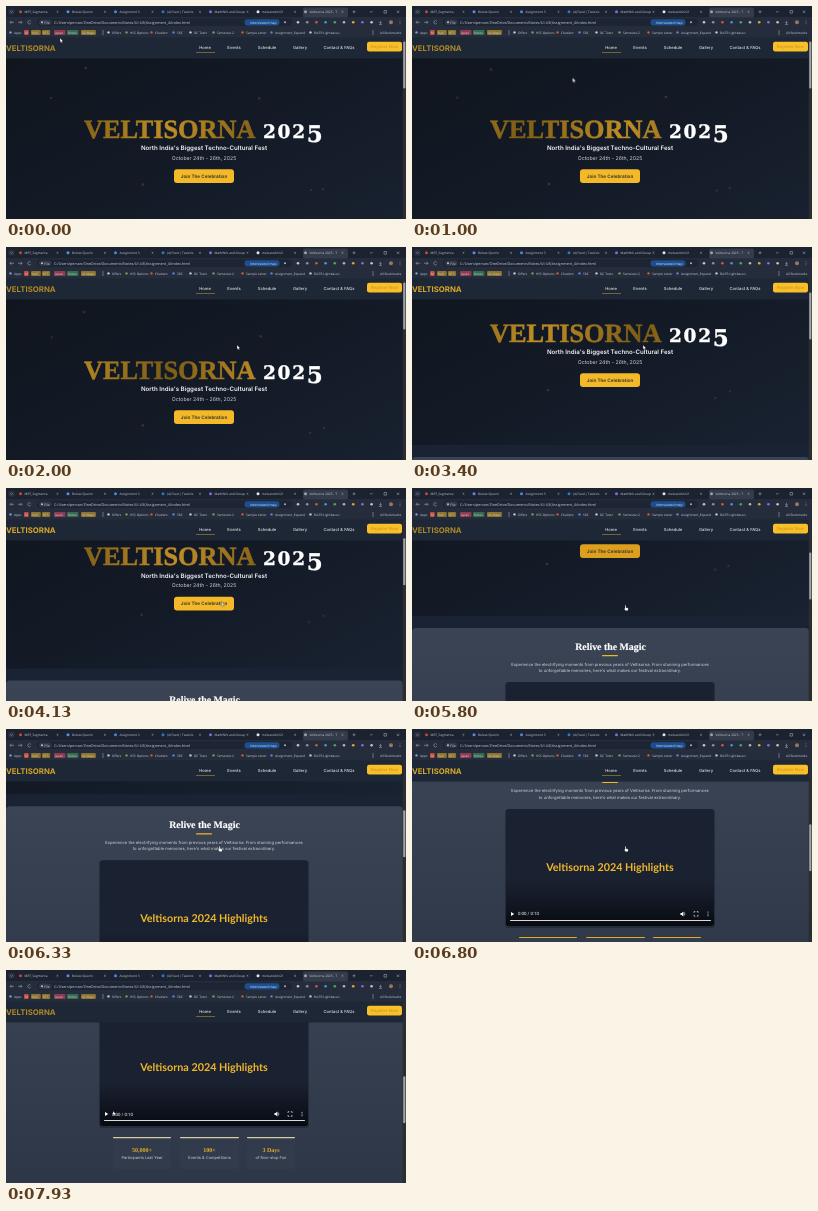
Animation of 400x213 px, one loop 8000 ms. Source, as an HTML page:

```html
<!DOCTYPE html>
<html lang="en">
<head>
<meta charset="utf-8">
<title>Festival page</title>
<style>
@property --scroll { syntax: "<number>"; inherits: true; initial-value: 0; }
html, body { margin: 0; width: 100%; height: 100%; overflow: hidden; background: #151c28; }
svg { display: block; width: 100%; height: 100%; animation: scroll 8s infinite ease-out; }
text { font-family: Inter, sans-serif; text-rendering: geometricPrecision; }
.mid { text-anchor: middle; }
.serif { font-family: "Liberation Serif", serif; font-weight: 700; }
.year { font-family: "DejaVu Serif", serif; font-weight: 700; letter-spacing: 1.7px; fill: #fff; stroke: #fff; stroke-width: .4; }
.ui { font-family: "Open Sans", sans-serif; fill: #c9ced8; }
.page { transform: translateY(calc(var(--scroll) * -1px)); }
.thumb { transform: translateY(calc(var(--scroll) * .27px)); }
.nav text { font-size: 4.17px; font-weight: 500; fill: #dde1e7; }
.blurb { font-size: 4.17px; fill: #cfd4dc; }
.stat { font-size: 6px; fill: #e3ae28; }
.label { font-size: 4px; fill: #ccd1d9; }
.logo { animation: glow 8s infinite; }
.cta { animation: hover 8s infinite; }
.rule { animation: pale 8s infinite; }
.pointer { animation: point 8s infinite ease-in-out; }
.arrow { animation: arrow 8s infinite step-end; }
.hand { animation: hand 8s infinite step-end; }
.mote { animation: drift 5s infinite alternate ease-in-out; }

@keyframes scroll {
  0%, 34% { --scroll: 0; }
  41.8%, 45% { --scroll: 37; }
  50%, 64.3% { --scroll: 54.5; }
  72%, 75.5% { --scroll: 107; }
  85% { --scroll: 221; }
  92%, 100% { --scroll: 262; }
}
@keyframes glow {
  0%, 25%, 73%, 100% { fill: #b08a28; }
  42%, 64%, 85% { fill: #dcaa2a; }
}
@keyframes hover {
  0%, 52% { fill: #f3b928; }
  55%, 100% { fill: #dda01e; }
}
@keyframes pale {
  0%, 86% { fill: #e0aa25; }
  92%, 100% { fill: #d5cba8; }
}
@keyframes point {
  0%, 3% { transform: translate(54px, 32px); }
  20%, 46% { transform: translate(231px, 98px); }
  54%, 89% { transform: translate(212px, 117px); }
  97%, 100% { transform: translate(107px, 141px); }
}
@keyframes arrow { 0% { opacity: 1; } 52% { opacity: 0; } 89% { opacity: 1; } }
@keyframes hand { 0% { opacity: 0; } 52% { opacity: 1; } 89% { opacity: 0; } }
@keyframes drift { to { transform: translate(2px, -5px); } }
</style>
</head>
<body>
<svg viewBox="0 0 400 213" preserveAspectRatio="none">
  <defs>
    <linearGradient id="sky" x1="0" y1="0" x2="1" y2="1">
      <stop stop-color="#10151d"/><stop offset=".5" stop-color="#131a26"/><stop offset="1" stop-color="#192231"/>
    </linearGradient>
    <linearGradient id="panel" x1="0" y1="0" x2="0" y2="1">
      <stop stop-color="#3a4454"/><stop offset="1" stop-color="#2b3545"/>
    </linearGradient>
    <linearGradient id="gold" gradientUnits="userSpaceOnUse" x1="78" y1="0" x2="278" y2="30" spreadMethod="repeat">
      <stop stop-color="#7c5c16"/><stop offset=".5" stop-color="#bf8e25"/><stop offset="1" stop-color="#7c5c16"/>
      <animateTransform attributeName="gradientTransform" type="translate" from="0 0" to="200 0" dur="4s" repeatCount="indefinite"/>
    </linearGradient>
    <linearGradient id="shade" x1="0" y1="0" x2="0" y2="1">
      <stop stop-color="#0b0f18" stop-opacity="0"/><stop offset="1" stop-color="#070a10"/>
    </linearGradient>
  </defs>

  <g class="page">
    <rect y="31" width="400" height="460" fill="#1a2333"/>
    <rect y="31" width="400" height="204" fill="url(#sky)"/>
    <g id="motes" fill="#a9803a" opacity=".3"></g>
    <text class="serif" x="78" y="131.5" font-size="26.3" fill="url(#gold)" stroke="url(#gold)" stroke-width=".5">VELTISORNA</text>
    <text class="year" x="257" y="131.5" font-size="18.5">202<tspan dy="4.6" font-size="23">5</tspan></text>
    <text class="mid" x="198" y="144" font-size="6.15" font-weight="600" fill="#f4f5f7">North India's Biggest Techno-Cultural Fest</text>
    <text class="mid" x="198" y="153.5" font-size="5.2" fill="#cdd2da">October 24th - 26th, 2025</text>
    <rect class="cta" x="168" y="163.3" width="60" height="13.7" rx="3"/>
    <text class="mid" x="198" y="171.8" font-size="4.65" font-weight="600" fill="#2b2d30">Join The Celebration</text>

    <rect y="247" width="397" height="260" rx="4" fill="url(#panel)"/>
    <text class="serif mid" x="198.5" y="269" font-size="9.9" fill="#fff" stroke="#fff" stroke-width=".2">Relive the Magic</text>
    <rect x="190" y="274" width="16" height="1.2" rx=".6" fill="#f2b526"/>
    <text class="blurb mid" x="198" y="284.6">Experience the electrifying moments from previous years of Veltisorna. From stunning performances</text>
    <text class="blurb mid" x="198" y="291.1">to unforgettable memories, here's what makes our festival extraordinary.</text>

    <rect x="93" y="301" width="210" height="119" rx="3.5" fill="#151c29" opacity=".45"/>
    <rect x="94" y="301" width="208" height="117" rx="3" fill="#1a2130"/>
    <rect x="94" y="372" width="208" height="46" rx="3" fill="url(#shade)"/>
    <text class="mid" x="198" y="363" font-size="10.8" font-weight="700" fill="#f0b72b" style="font-family:Lato,sans-serif">Veltisorna 2024 Highlights</text>
    <g fill="#fff">
      <path d="M99 404v4l3.2-2z"/>
      <text x="106" y="407.6" font-size="4.4" style="font-family:Roboto,sans-serif">0:00 / 0:10</text>
      <path d="M268.5 405h1.2l1.7-1.5v5l-1.7-1.5h-1.2z"/>
      <path d="M272.2 404.4q1.4 1.6 0 3.2M282 405v-1.3h1.3m1.5 0h1.3v1.3m0 2v1.3h-1.3m-1.5 0H282V407" fill="none" stroke="#fff" stroke-width=".6"/>
      <circle cx="296" cy="404.2" r=".5"/><circle cx="296" cy="406" r=".5"/><circle cx="296" cy="407.8" r=".5"/>
      <rect x="98" y="412" width="201" height="1" rx=".5" fill="#d9dbde"/>
    </g>
    <g id="stats"></g>
  </g>

  <rect y="31" width="397" height="21.5" fill="#1d2735"/>
  <text class="logo" x="0" y="44.8" font-size="7.8" font-weight="700">VELTISORNA</text>
  <g class="nav mid" id="nav"></g>
  <rect x="190" y="46" width="19" height=".6" fill="#b58d2c"/>
  <rect x="361" y="35.7" width="35" height="9.8" rx="2.2" fill="#f8bf2a"/>
  <text class="mid" x="378.5" y="42.1" font-size="4.17" font-weight="600" fill="#d39c1f">Register Now</text>

  <rect x="396.7" y="31" width="3.3" height="182" fill="#2b2d30"/>
  <rect class="thumb" x="397.2" y="35.5" width="2.2" height="47" rx="1" fill="#a0a2a5"/>

  <g id="browser"></g>

  <g class="pointer" stroke="#111" stroke-width=".3" fill="#fff">
    <path class="arrow" d="M0 0v4.4l1-.9.7 1.6.8-.4-.7-1.5h1.4z"/>
    <path class="hand" d="M1 .4q.5-.7 1 0v2l1.8.5q.7.3.5 1.2l-.5 1.6H1.6L0 3.8q0-.7 1-.2z"/>
  </g>
</svg>
<script>
const NS = "http://www.w3.org/2000/svg";
const into = (id) => (tag, attrs, content = "") => {
  const node = document.createElementNS(NS, tag);
  for (const [key, value] of Object.entries(attrs)) node.setAttribute(key, value);
  node.textContent = content;
  document.getElementById(id).append(node);
  return node;
};

// Page parts
const mote = into("motes");
[[45, 92], [253, 93], [316, 186], [135, 183], [303, 189], [78, 66]].forEach(([cx, cy], i) =>
  mote("circle", { cx, cy, r: 1 + (i % 2) * .3, class: "mote", style: `animation-delay:${-i * 1.3}s` }));

const nav = into("nav");
[["Home", 199], ["Events", 228], ["Schedule", 261], ["Gallery", 294], ["Contact & FAQs", 333]].forEach(([name, x]) =>
  nav("text", { x, y: 43.4 }, name));

const stat = into("stats");
[["50,000+", "Participants Last Year", 107, 58], ["100+", "Events & Competitions", 174, 59], ["3 Days", "of Non-stop Fun", 241, 48]]
  .forEach(([value, label, x, width]) => {
    const mid = x + width / 2;
    stat("rect", { x, y: 429, width, height: 32, rx: 2, fill: "#343e4e", opacity: .5 });
    stat("rect", { x, y: 429, width, height: 1.2, rx: .6, class: "rule" });
    stat("text", { x: mid, y: 444, class: "serif stat mid" }, value);
    stat("text", { x: mid, y: 451, class: "label mid" }, label);
  });

// Browser window
const ui = into("browser");
const bar = (x, y, width, height, fill, rx = 0) => ui("rect", { x, y, width, height, fill, rx });
const dot = (cx, cy, fill, r = 1.5) => ui("circle", { cx, cy, r, fill });
const word = (x, y, content, size = 3.2) => ui("text", { x, y, class: "ui", "font-size": size }, content);
const line = (d) => ui("path", { d, fill: "none", stroke: "#b4bac6", "stroke-width": .5 });
const cross = (x, y, r = .8) => line(`M${x - r} ${y - r}l${2 * r} ${2 * r}m0 ${-2 * r}l${-2 * r} ${2 * r}`);

bar(0, 0, 400, 11, "#1b2230");
bar(0, 11, 400, 20.5, "#252d3d");
bar(297, 1.5, 45, 10, "#343c4c", 2);
bar(2.5, 3, 6, 5.6, "#2c3444", 1.5);
line("M4.3 5.3l1.2 1.2 1.2-1.2");
[["MRT_Segmenta", "#c8453e"], ["Bolvex Quorin", "#5b8def"], ["Assignment 3", "#4c86e8"], ["(4) Feed | Tavlorix", "#2f75c6"],
  ["MathWrk and Group", "#8d67d8"], ["melvarodin/21", "#e5e7ea"], ["Veltisorna 2025 - T", "#9da3ab"]].forEach(([title, color], i) => {
  const x = 14.5 + i * 47.5;
  dot(x, 5.8, color);
  word(x + 4, 7, title);
  cross(x + 37, 5.8);
});
line("M346.5 5.8h3m-1.5-1.5v3M364 5.8h2.6M378 4.5h2.6v2.6H378z");
cross(392, 5.8, 1.2);

line("M8 16.3H4m1.5-1.5L4 16.3l1.5 1.5M12 16.3h4m-1.5-1.5l1.5 1.5-1.5 1.5M24.7 15.4a1.6 1.6 0 1 0 .1 1.7");
bar(31, 12.6, 255, 7.4, "#1d2535", 3.7);
bar(33, 13.6, 12.5, 5.4, "#303848", 2.7);
dot(36, 16.3, "#c3c7cd", 1);
word(38.2, 17.5, "File", 3.4);
word(48, 17.6, "C:/Users/person/OneDrive/Documents/Notes/UI-UE(Assignment_4/index.html", 3.75);
bar(238.5, 13.2, 35, 6.2, "#1d4f8e", 3);
word(244, 17.5, "Interviewed map", 3.4).style.fill = "#d6e8ff";
dot(279, 16.3, "#aab2c0", 1);
["#c3c7cd", "#8b929c", "#d95547", "#4d8ee8", "#49a667", "#b0b5bd", "#e2a53c", "#8b6ed0", "#c3c7cd"].forEach((color, i) =>
  dot(292 + i * 9.2, 16.3, color, 1.3));
line("M374.5 14.8v2.5m-1.2-1l1.2 1.2 1.2-1.2M373 18.4h3");
dot(385, 16.3, "#9b7658", 2);
[14.8, 16.3, 17.8].forEach((y) => dot(394, y, "#c3c7cd", .4));

word(8, 27.7, "Apps");
dot(4.5, 26.4, "#7f9ed6", 1.2);
[["M", 19, "#c74b3f"], ["Hall", 26, "#8d732c"], ["BTS", 37, "#8d732c"], ["Japan", 49, "#8f3a50"], ["Notes", 62, "#376b4f"], ["42 Maps", 76, "#8d732c"]]
  .forEach(([name, x, color]) => {
    bar(x - 1, 24, name.length * 1.7 + 3, 5, color, 1);
    word(x, 27.7, name);
  });
line("M97 24v5");
[["Offers", 106], ["HSS Options", 124], ["Chatlant", 149], ["SRC", 171], ["DC Tutor", 188], ["Semester-2", 211], ["Sample Letter", 240], ["Assignment_Expand", 269], ["BioTR Lightbase L", 308]]
  .forEach(([name, x], i) => {
    dot(x - 3.5, 26.4, ["#c3c7cd", "#6fa05c", "#cc5a45", "#5089d8"][i % 4], 1.2);
    word(x, 27.7, name);
  });
line("M367 24v5");
word(374, 27.7, "All Bookmarks");
</script>
</body>
</html>
```
